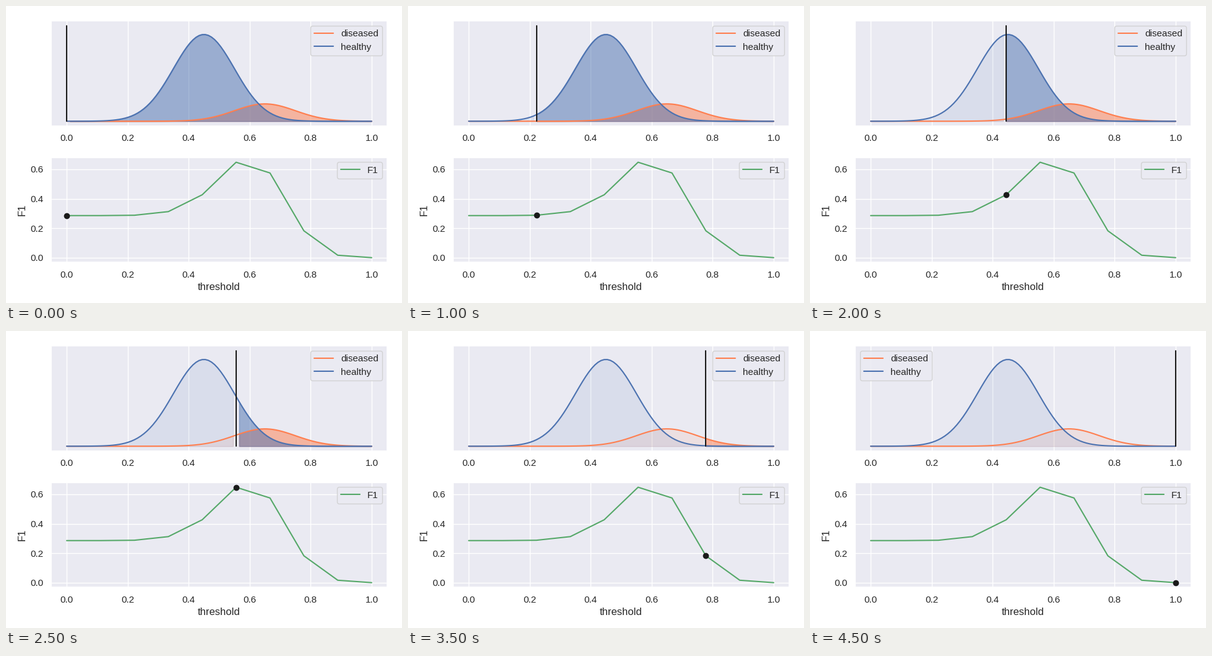
A matplotlib script that plays this animation: 640x480 px, repeating every 5000 ms.

```python
import math

import matplotlib.pyplot as plt
import numpy as np
from matplotlib.animation import FuncAnimation

INK, BLACK = "0.15", "0.1"
CORAL, BLUE, GREEN = "#FF7F50", "#4C72B0", "#55A868"
W, H = 640, 480
STEPS = 10
SICK, WELL = (0.65, 0.1, 1 / 6), (0.45, 0.1, 5 / 6)  # mean, spread, share

plt.rcParams.update({
    "font.family": "Liberation Sans", "font.size": 12, "text.color": INK,
    "axes.facecolor": "#EAEAF2", "axes.edgecolor": "white",
    "axes.labelcolor": INK, "axes.labelsize": 12, "axes.linewidth": 1.25,
    "axes.grid": True, "axes.axisbelow": True,
    "grid.color": "white", "grid.linewidth": 1,
    "xtick.color": INK, "ytick.color": INK,
    "xtick.labelsize": 11, "ytick.labelsize": 11,
    "xtick.major.size": 6, "ytick.major.size": 6,
    "xtick.bottom": False, "ytick.left": False,
    "legend.fontsize": 11, "lines.linewidth": 1.5,
    "lines.solid_capstyle": "round",
})


def density(x, mean, sd, share):
    z = (x - mean) / sd
    return share * np.exp(-z * z / 2) / (sd * math.sqrt(2 * math.pi))


def above(t, mean, sd, share):
    return share * 0.5 * math.erfc((t - mean) / (sd * math.sqrt(2)))


def f1_score(t):
    hit, false_alarm = above(t, *SICK), above(t, *WELL)
    return 2 * hit / (hit + false_alarm + SICK[2])


def add_axes(left, top, right, bottom):
    box = [left / W, 1 - bottom / H, (right - left) / W, (bottom - top) / H]
    return fig.add_axes(box, xlim=(-0.05, 1.05))


def padded(low, high):
    pad = 0.05 * (high - low)
    return low - pad, high + pad


x = np.linspace(0, 1, 100)
thresholds = np.linspace(0, 1, STEPS)
scores = [f1_score(t) for t in thresholds]
groups = [(density(x, *SICK), CORAL, "diseased"),
          (density(x, *WELL), BLUE, "healthy")]
peak = 1.1 * groups[1][0].max()

fig = plt.figure(figsize=(W / 100, H / 100), dpi=100, facecolor="white")

ax_top = add_axes(73.4, 24.4, 615.6, 193.9)
ax_top.set(ylim=padded(0, peak), yticks=[])
for y, color, name in groups:
    ax_top.plot(x, y, color=color, label=name)
bar, = ax_top.plot([], [], color=BLACK)

ax_low = add_axes(73.4, 244.8, 615.6, 414.4)
ax_low.set(ylim=padded(min(scores), max(scores)),
           xlabel="threshold", ylabel="F1")
ax_low.plot(thresholds, scores, color=GREEN, label="F1")
ax_low.legend(loc="upper right")
dot, = ax_low.plot([], [], "o", color=BLACK)


def update(i):
    t = thresholds[i]
    for old in list(ax_top.collections):
        old.remove()
    for y, color, _ in groups:
        ax_top.fill_between(x, y, where=x > t, color=color, alpha=0.5)
        ax_top.fill_between(x, y, where=x < t, color=color, alpha=0.1)
    bar.set_data([t, t], [0, peak])
    dot.set_data([t], [scores[i]])
    # the legend steps aside once the bar would run through it
    ax_top.legend(loc="upper left" if t > 0.8 else "upper right")


anim = FuncAnimation(fig, update, frames=STEPS, init_func=lambda: update(0),
                     interval=500, repeat=True, repeat_delay=0)
plt.show()
```
